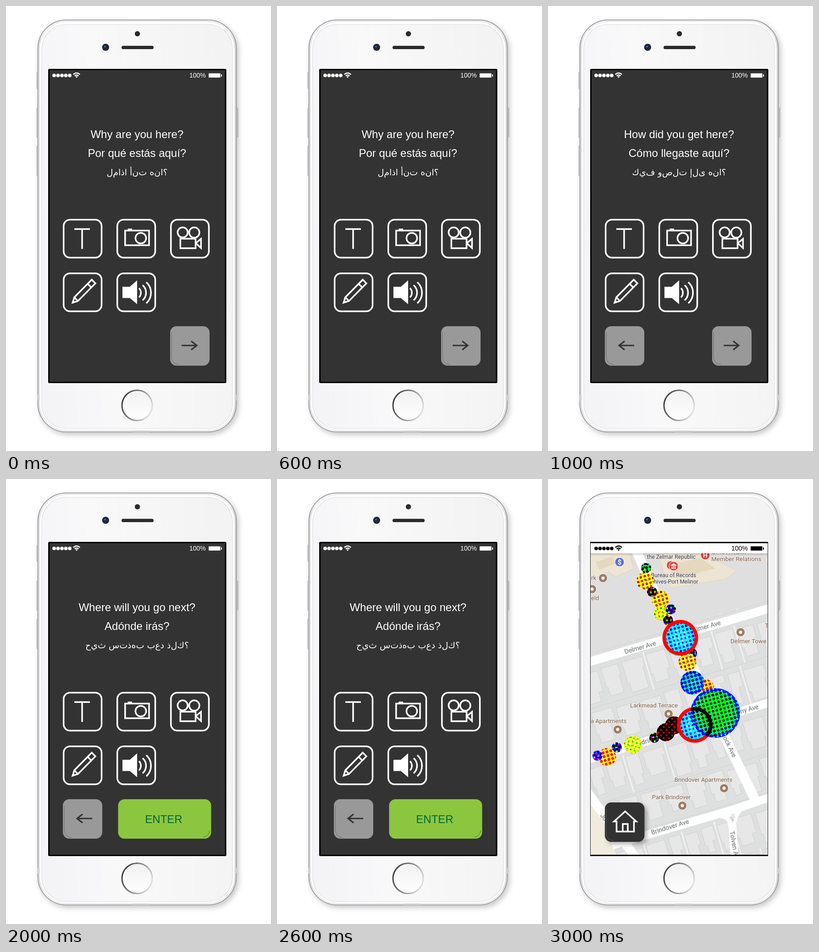
Animation, 578 px wide and 970 px high, one loop 4 s. Source, as an HTML page:

```html
<!DOCTYPE html>
<html lang="en">
<head>
<meta charset="utf-8">
<title>Phone survey</title>
<style>
html, body { margin: 0; width: 100%; height: 100%; overflow: hidden; background: #fff; }
svg { display: block; width: 100vw; height: 100vh; }
.ui { font-family: "Liberation Sans", Arial, sans-serif; }
.ask { font-size: 24px; fill: #fff; text-anchor: middle; }
.arabic { font: 19px "DejaVu Sans", sans-serif; fill: #fff; text-anchor: middle; direction: ltr; unicode-bidi: bidi-override; }
.line { fill: none; stroke: #fff; stroke-width: 3.5; }
.map text { font-family: Roboto, sans-serif; paint-order: stroke; stroke: #f3f3f3; stroke-width: 2px; stroke-linejoin: round; }
.spot { isolation: isolate; }
.ink { mix-blend-mode: multiply; }
</style>
</head>
<body>
<svg id="stage" viewBox="0 0 578 970" xmlns="http://www.w3.org/2000/svg"></svg>
<script>
const defs = [];

const tag = (name, attrs, body = "") =>
  `<${name} ${Object.entries(attrs).map(([k, v]) => `${k}="${v}"`).join(" ")}>${body}</${name}>`;
const rect = (x, y, width, height, rx, attrs) => tag("rect", { x, y, width, height, rx, ...attrs });
const disc = (cx, cy, r, fill, attrs = {}) => tag("circle", { cx, cy, r, fill, ...attrs });
const path = (d, attrs) => tag("path", { d, ...attrs });
const line = d => path(d, { class: "line" });
const group = (attrs, ...parts) => tag("g", attrs, parts.join(""));

function seeded(seed) {
  return () => (seed = (seed * 16807) % 2147483647) / 2147483647;
}

// Phone body
function phone() {
  const side = (x, y, h) => rect(x, y, 4, h, 1.5, { fill: "#e2e2e4", stroke: "#b4b4b7", "stroke-width": 0.7 });
  const band = x => rect(x, 847, 8, 13, 0, { fill: "#d0d0d2" });
  return [
    side(66.5, 144, 36), side(66.5, 222, 65), side(66.5, 305, 65), side(502, 222, 64),
    rect(69.5, 30.5, 433, 898, 62, { fill: "url(#edge)", stroke: "#a0a0a3", "stroke-width": 2, filter: "url(#cast)" }),
    band(69), band(495),
    rect(73, 34, 426, 891, 59, { fill: "#fff", stroke: "#dedee0", "stroke-width": 1 }),
    rect(78, 40, 416, 881, 54, { fill: "url(#face)", stroke: "#dcdcde", "stroke-width": 1.2 }),
    rect(275, 926.5, 40, 2.5, 1, { fill: "#c4c4c6" }),
    disc(286.6, 60.5, 5.7, "#2b2b2b"),
    rect(252, 86.7, 70, 7.4, 3.7, { fill: "#2b2b2b" }),
    disc(217.3, 90, 7.7, "#26282e"), disc(217.3, 90, 4.6, "#18264c"), disc(216, 88.6, 1.8, "#5874a6"),
    disc(286, 870.5, 33, "url(#key)", { stroke: "url(#ring)", "stroke-width": 3 })
  ].join("");
}

function statusBar(color) {
  const dots = [0, 1, 2, 3, 4].map(i => disc(105 + i * 8.5, 151.3, 3.9, color)).join("");
  const arc = { fill: "none", stroke: color, "stroke-width": 2.3 };
  return dots +
    path("M146.8 149.4Q154 142.6 161.2 149.4", arc) +
    path("M149.6 152.5Q154 148.4 158.4 152.5", arc) +
    path("M151.5 154.2Q154 152 156.5 154.2L154 156.8Z", { fill: color }) +
    tag("text", { x: 400, y: 156, class: "ui", "font-size": 14, fill: color }, "100%") +
    rect(442, 146.8, 25.5, 9.2, 0.5, { fill: color }) +
    rect(469, 149, 2, 5, 0.5, { fill: color });
}

// Question screens
const box = (x, y) => rect(x + 1.7, y + 1.7, 82.8, 82.8, 14, { class: "line" });

function tools() {
  return [
    box(124, 464), box(241, 464), box(358, 464), box(124, 581), box(241, 581),
    line("M149 486.3H183M166 486V529.5"),
    line("M259.8 489.5H312V521.5H259.8ZM265.5 487H275"),
    disc(294, 506, 11.6, "#333", { class: "line" }),
    disc(385.3, 493.5, 11, "none", { class: "line" }),
    disc(410.7, 493.8, 11.2, "none", { class: "line" }),
    line("M380.3 507.3H413.5V528H380.3ZM414 517L425.3 507.5V527.5Z"),
    line("M145.5 646.5L149 635L187 596.5L195 604.5L157 643ZM149 635L157 643M178 605.5L186 613.5"),
    path("M142.5 649.5L146 641L151 646Z", { fill: "#fff" }),
    path("M254 612H270L286 598V650L270 636.5H254Z", { fill: "#fff" }),
    line("M290 615A14 14 0 0 1 290 635M298 608.5A22 22 0 0 1 298 641.5M306 602A31 31 0 0 1 306 648")
  ].join("");
}

function arrowKey(x, dir) {
  const mid = x === 124 ? 171 : 400;
  const tip = mid + 17 * dir;
  return rect(x, 698, 86, 86, 14, { fill: "#999" }) +
    path(`M${x + 3} 711V765Q${x + 4} 780 ${x + 19} 781.5`, { fill: "none", stroke: "#6b6b6b", "stroke-width": 1 }) +
    path(`M${mid - 17 * dir} 740H${tip - dir}M${tip - 13 * dir} 730.5L${tip - dir} 740L${tip - 13 * dir} 749.5`,
      { fill: "none", stroke: "#333", "stroke-width": 3.2 });
}

const enterKey = () =>
  rect(244.5, 698, 203, 86, 14, { fill: "#8cc63f" }) +
  path("M444 766Q443 779 430 780.5", { fill: "none", stroke: "#4d7a2a", "stroke-width": 1 }) +
  tag("text", { x: 344, y: 749.5, class: "ui", "font-size": 24, fill: "#006837", "text-anchor": "middle" }, "ENTER");

// The Arabic runs left to right in unjoined letters.
const unjoined = s => [...s].join("\u200c");

function question({ base, lines, keys }) {
  const [english, spanish, arabic] = lines;
  return rect(93.5, 138.5, 385.5, 682, 1, { fill: "#333", stroke: "#000", "stroke-width": 3 }) +
    statusBar("#fff") +
    tag("text", { x: 285.8, y: base, class: "ui ask" }, english) +
    tag("text", { x: 285.8, y: base + 41, class: "ui ask" }, spanish) +
    tag("text", { x: 286, y: base + 81, class: "arabic" }, unjoined(arabic)) +
    tools() + keys;
}

// Map screen
function lots() {
  const rnd = seeded(41);
  const out = [];
  for (const [top, depth] of [[-98, 78], [17, 78], [106, 80], [220, 78], [307, 74], [416, 80], [500, 60]]) {
    let x = -70;
    while (x < 520) {
      const w = 26 + rnd() * 22, y = top + rnd() * 8, d = depth - 8 - rnd() * 18;
      const notch = 4 + rnd() * 8, cut = d * (0.3 + rnd() * 0.4);
      out.push(path(`M${x} ${y}h${w}v${cut}h${-notch}v${d - cut}H${x + 4}v${-d * 0.3}h-4Z`,
        { fill: "#e7e7e7", stroke: "#d3d4d4", "stroke-width": 1.3 }));
      if (rnd() < 0.35) out.push(path(`M${x + w + 5} ${top - 4}v${depth + 8}`, { stroke: "#f1f1f1", "stroke-width": 3 }));
      x += w + 9;
    }
    out.push(path(`M-70 ${top + depth + 4}H520`, { stroke: "#d5d6d6", "stroke-width": 1.5 }));
  }
  return group({ transform: "translate(92 398) rotate(-16.5)" }, ...out);
}

function roads() {
  const road = (d, w) => path(d, { fill: "none", stroke: "#fff", "stroke-width": w, "stroke-linejoin": "round" });
  return road("M85 400L490 280", 19) + road("M85 612L490 485", 18) +
    road("M140 798L400 722L490 692", 18) +
    road("M192 155L240 265L290 350L318 415L380 550L454 704", 21) +
    road("M85 682L195 830", 20) + road("M376 731Q402 732 403 765L407 830", 17) +
    road("M424 716Q404 734 404 765", 10) +
    path("M394 736L409 734L403 749Z", { fill: "#e3e3e3" }) +
    path("M399 737L404 745M404 745V741M404 745L400 744", { fill: "none", stroke: "#b5b5b5", "stroke-width": 1 });
}

function places() {
  const sand = { fill: "#ede4d3", stroke: "#dfd3bd", "stroke-width": 1.2 };
  return path("M92 162H480V262L240 335L92 380Z", { fill: "#dfdfdf" }) +
    path("M92 162H178L187 196L146 214L132 202L92 222Z", sand) +
    path("M104 181L140 169L148 184L112 198Z", { fill: "#e5d8bf" }) +
    path("M240 162H342L412 200L388 218L268 238L252 205Z", sand) +
    path("M262 188L331 172L365 195L276 217Z", { fill: "#e5d8bf" }) +
    path("M92 700L124 750L150 821H92Z", { fill: "#f0ebdc" });
}

function labels() {
  const brown = "#7d5c46";
  const name = (x, y, s, attrs = {}) => tag("text", { x, y, "font-size": 13, fill: brown, ...attrs }, s);
  const mid = { "text-anchor": "middle" };
  const dark = { fill: "#333", "font-size": 12, ...mid };
  const street = (x, y, turn, s) => tag("text",
    { transform: `translate(${x} ${y}) rotate(${turn})`, y: 5, "font-size": 14, fill: "#777", ...mid }, s);
  const pin = (x, y) => disc(x, y, 9.5, "#a07c64", { stroke: "#fff", "stroke-width": 1 }) + disc(x, y, 3.4, "#fff");
  const badge = (x, y, color, s) => disc(x, y, 10, color, { stroke: "#fff", "stroke-width": 1 }) +
    tag("text", { x, y: y + 5, "font-size": 14, "font-weight": 700, fill: "#fff", style: "stroke:none", ...mid }, s);
  return [
    street(201, 367, -16, "Delmer Ave"), street(350, 320, -16, "lmer Ave"),
    street(208, 573, -16, "andrin"), street(439, 501, -16, "ny Ave"),
    street(396, 582, 64, "lock Ave"), street(266, 758, -17, "Brindover Ave"),
    street(406, 794, 80, "Tolven A"), street(122, 737, 55, "Jo"),
    pin(120, 216), pin(96, 240), pin(420, 334), pin(263, 512), pin(152, 546), pin(384, 674), pin(293, 712),
    badge(156, 181, "#5c6fdc", "$"), badge(343, 166, "#d8453e", "H"),
    disc(268, 188, 9.5, "#d8453e", { stroke: "#fff" }), disc(274, 190, 10, "#d8453e", { stroke: "#fff" }),
    path("M268.5 188L274 184.5L279.5 188ZM269 194.5H279M270.5 189V194M274 189V194M277.5 189V194",
      { fill: "#fff", stroke: "#fff", "stroke-width": 1.3 }),
    name(269, 174, "the Zelmar Republic", dark), name(274, 213.5, "Bureau of Records", dark),
    name(274, 227.5, "rchives-Port Melinor", dark),
    name(357, 164, "OPRA Health"), name(356, 179, "Member Relations", { "font-size": 13.5 }),
    name(94, 220, "rk"), name(94, 264, "eld"), name(473, 324, "T"),
    name(398, 358, "Delmer Towe", { "font-size": 13.5 }),
    name(231, 497.5, "Larkmead Terrace", mid), name(93, 532, "a Apartments"),
    name(339, 660, "Brindover Apartments", mid), name(269, 697.5, "Park Brindover", mid)
  ].join("");
}

// Halftone trail: overprinted cyan, magenta, yellow and black dots
const plates = [["#0ff", 15], ["#f0f", 75], ["#ff0", 0], ["#000", 45]];
const gap = 8.5;

function screenDots(plate, r) {
  const [color, turn] = plates[plate];
  const id = `dot${plate}-${r * 10}`;
  if (!defs.some(d => d.includes(`"${id}"`))) {
    defs.push(tag("pattern", { id, width: gap, height: gap, patternUnits: "userSpaceOnUse", patternTransform: `rotate(${turn})` },
      disc(gap / 2, gap / 2, r, color)));
  }
  return `url(#${id})`;
}

// Each ink is a list of dot radii in plate order; 7 covers the paper.
const spot = (x, y, r, ink) => group({ class: "spot" }, disc(x, y, r, "#fff"),
  ...ink.map((size, i) => size ? disc(x, y, r, size >= 7 ? plates[i][0] : screenDots(i, size), { class: "ink" }) : ""));

function trail() {
  const inks = {
    leaf: [5, 3, 4.5, 2], sun: [1.5, 2.6, 5, 0], lime: [2, 1.5, 5, 0], pale: [2, 1, 4.5, 0],
    fire: [0, 3, 5.2, 0], coal: [4, 4.2, 4.2, 2.6], ember: [0, 7, 7, 4.4],
    night: [4.2, 4.2, 2.4, 2.6], dusk: [4, 4.6, 0, 2]
  };
  const small = list => list.map(([x, y, r, ink]) => spot(x, y, r, inks[ink])).join("");
  const target = (x, y) => disc(x, y, 39, "#f00") + spot(x, y, 31, [5.4, 2.8, 0, 0]) + spot(x, y, 20, [4.5, 2.2, 0, 0]);
  const globe = spot(365, 510, 54, [5, 4.4, 0, 0]) + spot(365, 510, 48, [7, 3, 4, 0]) + spot(365, 510, 36, [7, 2.6, 4.7, 0]);

  defs.push(tag("clipPath", { id: "cross" }, disc(320, 536, 39, "#000")));
  return small([
    [212, 222, 19, "sun"], [214, 194, 11, "leaf"], [245, 262, 19, "sun"], [227, 246, 11, "coal"],
    [247, 292, 16, "lime"], [268, 284, 11, "night"], [262, 308, 11, "coal"],
    [313, 380, 12, "night"], [304, 399, 19.5, "sun"]
  ]) + target(288.5, 346) + small([[345, 454, 17, "fire"]]) +
    spot(315, 444, 26, [5.2, 4, 1.5, 0]) + spot(315, 444, 18, [5.6, 3.2, 2.4, 0]) + globe +
    small([[275, 537, 19.5, "ember"], [257, 552, 19.5, "ember"], [232, 564, 11, "coal"],
      [185, 579, 19.5, "pale"], [150, 585, 11, "night"], [129, 606, 19.5, "fire"], [108, 603, 11, "dusk"]]) +
    target(320, 536) + group({ class: "ink", "clip-path": "url(#cross)" }, globe);
}

const homeKey = () =>
  rect(124, 705, 86.5, 86, 14, { fill: "#333", filter: "url(#soft)" }) +
  path("M127 718V772Q128 787 143 788.5", { fill: "none", stroke: "#555", "stroke-width": 1 }) +
  line("M144 746.5L168.3 724.5L192.5 746.5H187.5V768.5H149.5V746.5ZM163 768V752H174V768");

function mapScreen() {
  return group({ class: "map", "clip-path": "url(#screen)" },
    rect(92, 137, 388, 685, 0, { fill: "#dedfdf" }),
    lots(), places(), roads(), labels(), trail(), homeKey(),
    rect(92, 162, 388, 6, 0, { fill: "url(#drop)" }),
    rect(92, 137, 388, 25, 0, { fill: "#fff" })) +
    rect(92.5, 138.5, 387, 682, 0, { fill: "none", stroke: "#222", "stroke-width": 1 }) +
    path("M92 138.5H480M92 820.5H480", { stroke: "#000", "stroke-width": 3 }) +
    statusBar("#000");
}

const back = arrowKey(124, -1), next = arrowKey(358, 1);
const scenes = [
  question({ base: 287.5, keys: next,
    lines: ["Why are you here?", "Por qué estás aquí?", "لماذا أنت هنا؟"] }),
  question({ base: 288.3, keys: back + next,
    lines: ["How did you get here?", "Cómo llegaste aquí?", "كيف وصلت إلى هنا؟"] }),
  question({ base: 288.3, keys: back + enterKey(),
    lines: ["Where will you go next?", "Adónde irás?", "حيث ستذهب بعد ذلك؟"] }),
  mapScreen()
];

const ramp = (id, attrs, ...stops) => tag("linearGradient", { id, ...attrs }, stops.map(([offset, color, alpha = 1]) =>
  tag("stop", { offset, "stop-color": color, "stop-opacity": alpha })).join(""));
const shadow = (id, dx, dy, blur, alpha) => tag("filter", { id, x: "-20%", y: "-20%", width: "150%", height: "150%" },
  tag("feDropShadow", { dx, dy, stdDeviation: blur, "flood-color": "#000", "flood-opacity": alpha }));
const down = { x1: 0, y1: 0, x2: 0, y2: 1 };

defs.push(
  ramp("edge", {}, [0, "#d8d8da"], [0.03, "#f6f6f7"], [0.97, "#f2f2f3"], [1, "#cfcfd1"]),
  ramp("face", { x1: 0, y1: 0.6, x2: 1, y2: 0.4 }, [0, "#f4f4f7"], [0.35, "#f9f9fa"], [0.65, "#f6f6f7"], [1, "#f3f3f3"]),
  ramp("key", down, [0, "#f1f1f2"], [1, "#fff"]),
  ramp("ring", { x1: 0, y1: 0.3, x2: 1, y2: 0.7 }, [0, "#3c3c3c"], [0.5, "#8c8c8c"], [1, "#e4e4e4"]),
  ramp("drop", down, [0, "#000", 0.16], [1, "#000", 0]),
  shadow("cast", 4, 5, 6, 0.22), shadow("soft", 5, 5, 5, 0.3),
  tag("clipPath", { id: "screen" }, rect(92, 137, 388, 685, 0, {}))
);

const stage = document.getElementById("stage");
stage.innerHTML = tag("defs", {}, defs.join("")) + phone() +
  scenes.map(s => group({ class: "scene", display: "none" }, s)).join("");
const layers = [...stage.querySelectorAll(".scene")];

function draw(ms) {
  const now = Math.floor((ms % 4000) / 1000);
  layers.forEach((layer, i) => layer.setAttribute("display", i === now ? "inline" : "none"));
}

function tick(ms) {
  draw(ms);
  requestAnimationFrame(tick);
}
draw(0);
requestAnimationFrame(tick);
</script>
</body>
</html>
```
